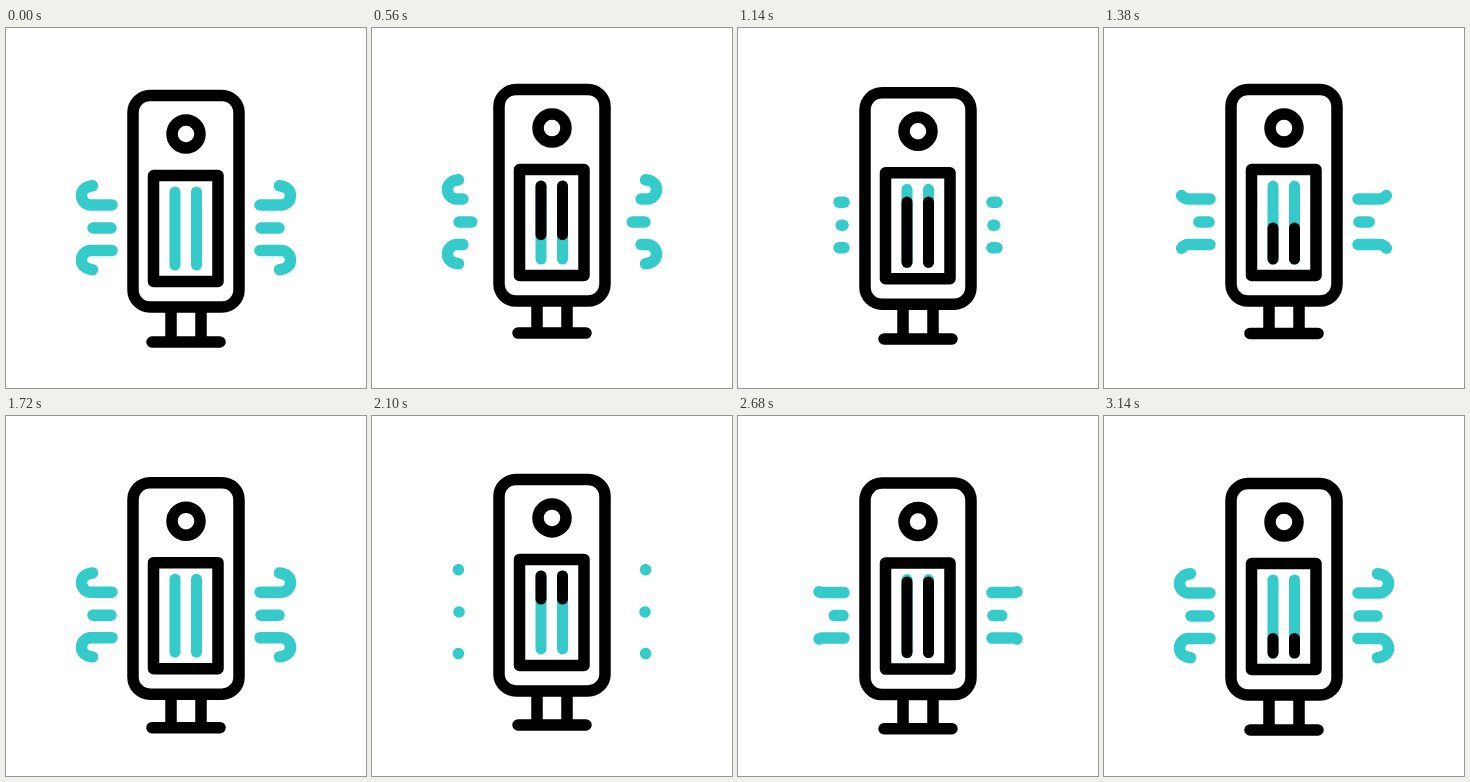
Write an HTML page that moves like this. It is 360x360 px and loops after 3160 ms.

```html
<!DOCTYPE html>
<html lang="en">
<head>
<meta charset="utf-8">
<title>Heater</title>
<style>
  html, body { margin: 0; width: 100%; height: 100%; overflow: hidden; background: #fff; }
  svg { display: block; width: 100vw; height: 100vh; }
  g { fill: none; stroke-width: 11.5; stroke-linecap: round; stroke-linejoin: round; }
  .ink { stroke: #000; }
  .air { stroke: #35cbcb; stroke-width: 11; }
  .dark { stroke: #000; }
</style>
</head>
<body>
<svg viewBox="0 0 360 360">
  <defs>
    <g id="side">
      <path class="wave" pathLength="1" d="M106 177H85C79.5 177 75.5 172.5 75.5 167C75.5 162.500 79.500 158.500 86.500 157.800"/>
      <path class="wave" pathLength="1" d="M105 200H87"/>
      <path class="wave" pathLength="1" d="M106 222.5H85C79.5 222.5 75.5 227 75.5 232.5C75.5 237 79.5 241 86.5 241.7"/>
    </g>
  </defs>
  <g class="ink"><path id="stand"/></g>
  <g id="unit">
    <g class="ink">
      <rect x="127" y="67.5" width="106" height="211.5" rx="17"/>
      <circle cx="180" cy="106" r="14"/>
      <rect x="147.5" y="147.5" width="64.5" height="106"/>
    </g>
    <g class="air">
      <path d="M169 164V237M190.500 164V237"/>
      <path class="dark" pathLength="1" d="M169 164V237"/>
      <path class="dark" pathLength="1" d="M190.500 164V237"/>
      <use href="#side"/>
      <use href="#side" transform="translate(360 0) scale(-1 1)"/>
    </g>
  </g>
</svg>
<script>
const LOOP = 3160, STEP = 20, HOLD = 160, FOOT_LAG = 40;
const unit = document.getElementById('unit');
const stand = document.getElementById('stand');
const waves = document.querySelectorAll('.wave');
const rods = document.querySelectorAll('.dark');

// [time, height] of the bob
const bob = [[0, 0], [380, 1], [740, 0], [1250, 1], [1660, 0], [2110, 1], [2600, 0]];
// [start, end] of each wipe
const rodWipes = [
  { cover: [0, 600], clear: [875, 1475] },
  { cover: [1750, 2350], clear: [2500, 3100] }
];
const waveWipes = [
  { leave: [150, 840], grow: [840, 1540] },
  { leave: [1550, 1950], grow: [2080, 2980] }
];

const part = (t, [a, b]) => Math.min(1, Math.max(0, (t - a) / (b - a)));
const ease = p => (1 - Math.cos(Math.PI * p)) / 2;

function lift(t) {
  for (let i = 1; i < bob.length; i++) {
    const [a, from] = bob[i - 1], [b, to] = bob[i];
    if (t < b) return from + (to - from) * ease(part(t, [a, b]));
  }
  return 0;
}

function trim(list, start, end, dot) {
  const len = Math.max(end - start, dot);
  for (const el of list) {
    el.style.visibility = len > 0 ? 'visible' : 'hidden';
    el.style.strokeDasharray = len + ' 3';
    el.style.strokeDashoffset = -Math.min(start, 1 - len);
  }
}

function draw(t) {
  const up = -6 * lift(t);
  const foot = 314 - 9 * lift(Math.max(0, t - FOOT_LAG));
  const top = 281 + up;
  unit.setAttribute('transform', `translate(0 ${up})`);
  stand.setAttribute('d', `M165 ${top}V${foot}M195 ${top}V${foot}M146 ${foot}H214`);

  const rod = rodWipes[t < 1750 ? 0 : 1];
  trim(rods, part(t, rod.clear), part(t, rod.cover), 0);

  const w = waveWipes[t < 1550 ? 0 : 1];
  if (t < w.grow[0]) trim(waves, ease(part(t, w.leave)), 1, 0.001);
  else trim(waves, 0, ease(part(t, w.grow)), 0.001);
}

const begin = performance.now();
function tick() {
  const t = (performance.now() - begin) % LOOP;
  draw(Math.max(0, Math.floor(t / STEP) * STEP - HOLD));
  requestAnimationFrame(tick);
}
tick();
</script>
</body>
</html>
```
